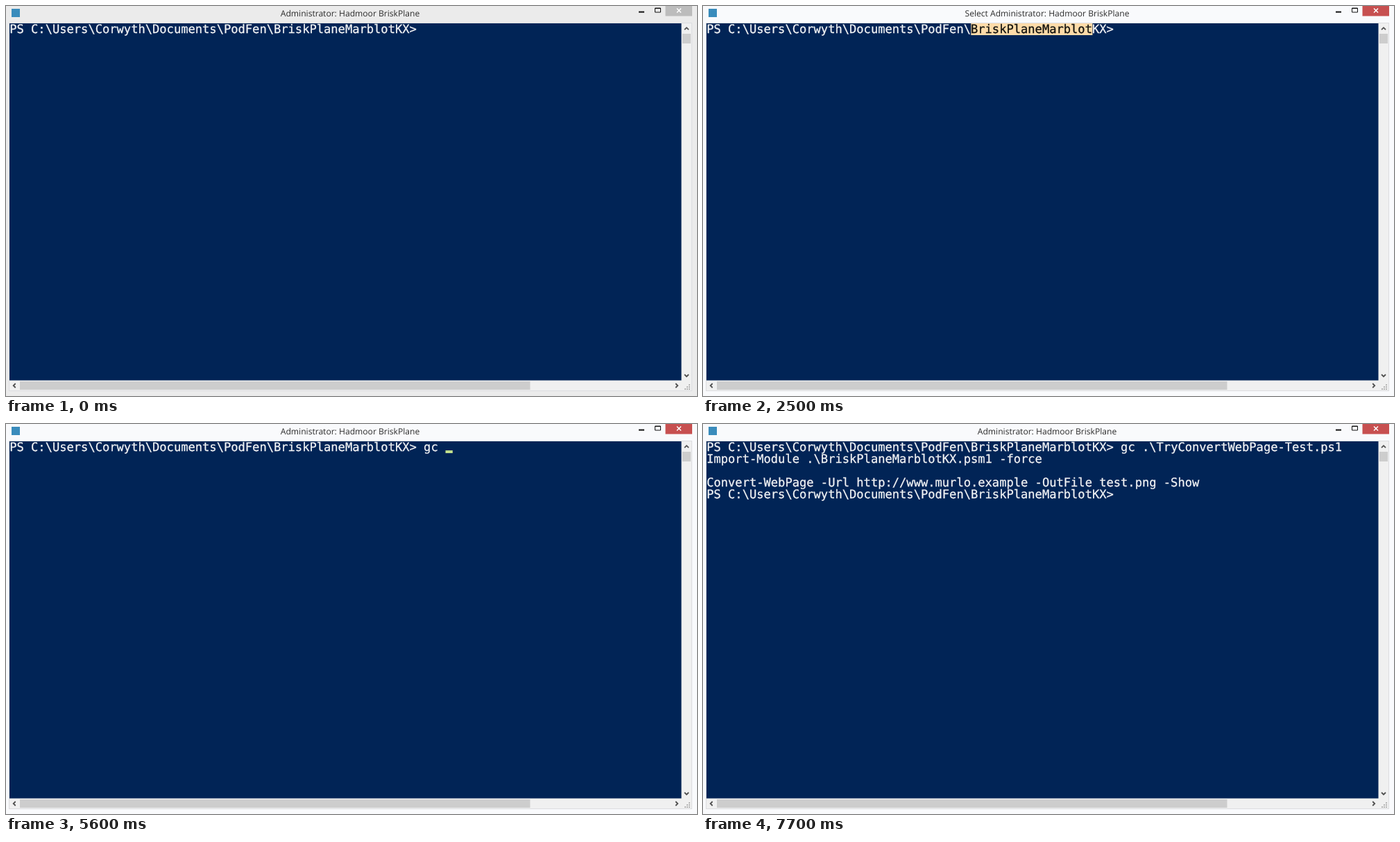
Write an HTML page that moves like this. It is 996 px wide and 562 px high and loops after 8 s.

```html
<!DOCTYPE html>
<html lang="en">
<head>
<meta charset="utf-8">
<title>Console</title>
<style>
  html, body { margin: 0; width: 100%; height: 100%; overflow: hidden; background: #ebebeb; }
  svg { display: block; width: 996px; height: 562px; }
  text { white-space: pre; text-rendering: geometricPrecision; }
  #title { font: 12.1px "Open Sans", "Noto Sans", sans-serif; text-anchor: middle; fill: #2b2b2b; }
  #lines text { font: 17.1px "DejaVu Sans Mono", monospace; fill: #f2f2f4; stroke: #f2f2f4; stroke-width: .3; }
  #lines .sel { fill: #11120f; stroke: #11120f; }
  .chev { fill: none; stroke: #505050; stroke-width: 1.8; }
</style>
</head>
<body>
<svg viewBox="0 0 996 562">
  <rect id="frame" width="996" height="562"/>
  <rect x="8" y="4" width="12" height="12" fill="#3a8cbc"/>
  <text id="title" x="496" y="15.2"></text>

  <rect x="912" y="7.6" width="8" height="2" fill="#111"/>
  <path d="M935.5 3h8v6h-8zM935 3.5h9" fill="none" stroke="#111"/>
  <rect id="close" x="950.5" width="38.5" height="14.5"/>
  <path d="M967 3.5l6 6m0-6l-6 6" stroke="#fff" stroke-width="1.5"/>

  <rect x="4.5" y="24.5" width="984" height="530" fill="#f0f0f0" stroke="#dcdde0"/>
  <rect x="5" y="25" width="968.5" height="514.5" fill="#012456"/>
  <rect x="975" y="40" width="12" height="14" fill="#cdcdcd"/>
  <rect x="20" y="541" width="735.5" height="12" fill="#cdcdcd"/>
  <path class="chev" d="M978 34.2l3-3 3 3M978 531l3 3 3-3M13.7 544l-3 3 3 3M965.2 544l3 3-3 3"/>
  <path fill="#b4b4b4" d="M984 545h2v2h-2zM984 548h2v2h-2zM984 551h2v2h-2zM981 548h2v2h-2zM981 551h2v2h-2zM978 551h2v2h-2z"/>

  <rect id="mark" height="17" fill="#fedba9"/>
  <g id="lines"></g>
  <rect id="cursor" y="38" width="10.3" height="4" fill="#c1df8c"/>
</svg>
<script>
const LOOP = 8000, CELL = 10.3, LEFT = 5.2, TOP = 25, ROW = 17.15, BASELINE = 38.7;
const FOLDER = 37, PROMPT_LEN = 58;
const CLICKED = { col: 79, row: 8 };
const prompt = 'PS C:\\Users\\Corwyth\\Documents\\PodFen\\BriskPlaneMarblotKX> ';
const command = 'gc .\\TryConvertWebPage-Test.ps1';
const output = [
  'Import-Module .\\BriskPlaneMarblotKX.psm1 -force',
  '',
  'Convert-WebPage -Url http://www.murlo.example -OutFile test.png -Show',
  prompt
];

const FOCUS = 1200, SELECT = 1700, DESELECT = 3900, CLEAR = 4700, ENTER = 7700;
const blinks = [1700, 2200, 2600, 3100, 3600, 4100, 4600, 5100, 5600, 6000, 6500, 6900, 7500, 7700];
const swept = [1, 2, 5, 7, 10, 12, 14, 16, 17, 18, 19]; // cells, one step per 100 ms
const typed = [[0, ''], [4700, 'g'], [4800, 'gc '], [6300, 'gc t'], [6400, 'gc tr'], [6900, command]];

const $ = id => document.getElementById(id);
const set = (el, attrs) => { for (const k in attrs) el.setAttribute(k, attrs[k]); };
const colX = col => LEFT + col * CELL;
const shown = on => on ? 'visible' : 'hidden';

function make(tag, parent, attrs = {}) {
  const el = document.createElementNS('http://www.w3.org/2000/svg', tag);
  set(el, attrs);
  return parent.appendChild(el);
}

const rows = Array.from({ length: 1 + output.length }, (_, i) =>
  make('text', $('lines'), { x: LEFT, y: BASELINE + i * ROW }));
const [before, selected, after] = ['', 'sel', ''].map(c => make('tspan', rows[0], { class: c }));
output.forEach((line, i) => { rows[i + 1].textContent = line; });

function draw(t) {
  const active = t >= FOCUS;
  const selecting = t >= SELECT && t < CLEAR;
  const dragging = t >= SELECT && t < DESELECT;

  set($('frame'), { fill: active ? '#f9fafc' : '#ebebeb' });
  set($('close'), { fill: active ? '#c75050' : '#bcbcbc' });
  $('title').textContent = (selecting ? 'Select ' : '') + 'Administrator: Hadmoor BriskPlane';

  const count = dragging ? swept[Math.min(swept.length - 1, Math.floor((t - SELECT) / 100))] : 0;
  const input = typed.filter(([at]) => t >= at).pop()[1];
  const line = prompt + input;
  before.textContent = line.slice(0, FOLDER);
  selected.textContent = line.slice(FOLDER, FOLDER + count);
  after.textContent = line.slice(FOLDER + count);

  set($('mark'), {
    x: colX(dragging ? FOLDER : CLICKED.col),
    y: TOP + (dragging ? 0 : CLICKED.row * ROW),
    width: (dragging ? count : 1) * CELL,
    visibility: shown(selecting)
  });
  set($('cursor'), {
    x: colX(PROMPT_LEN + input.length),
    visibility: shown(blinks.filter(at => t >= at).length % 2)
  });
  rows.slice(1).forEach(row => set(row, { visibility: shown(t >= ENTER) }));
}

function tick() {
  draw(performance.now() % LOOP);
  requestAnimationFrame(tick);
}
tick();
</script>
</body>
</html>
```
